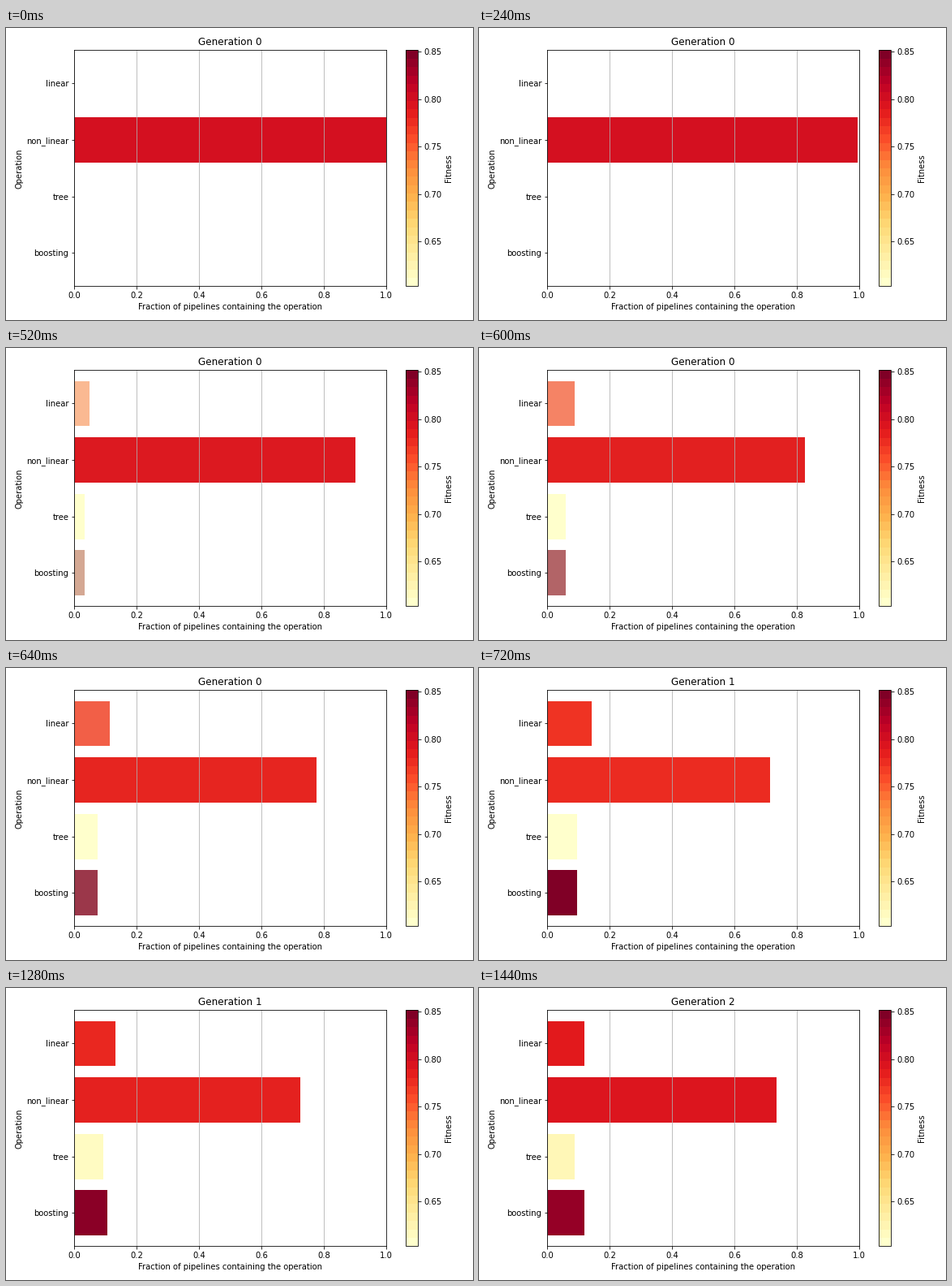
Recreate the animation shown at these times as a matplotlib script. Size 576x360 px, loop 2160 ms.

```python
import matplotlib.pyplot as plt
from matplotlib.animation import FuncAnimation
from matplotlib.cm import ScalarMappable
from matplotlib.colors import Normalize
import numpy as np

W, H, DPI = 576, 360, 72
STEPS = 18      # frames per generation
POWER = 4       # easing exponent

plt.rcParams.update({"font.family": "DejaVu Sans", "font.size": 10})

labels = ["linear", "non_linear", "tree", "boosting"]
cmap = plt.get_cmap("YlOrRd")

# One row per generation: share of pipelines and position on the colour scale
shares = np.array([
    [0, 1, 0, 0],
    [3 / 21, 15 / 21, 2 / 21, 2 / 21],
    [4 / 34, 25 / 34, 3 / 34, 4 / 34],
])
levels = np.array([
    [0, 0.80, 0, 0],
    [0.69, 0.71, 0, 1],
    [0.75, 0.773, 0.06, 0.955],
])
colors = cmap(levels)


def box(left, top, right, bottom):
    return [left / W, 1 - bottom / H, (right - left) / W, (bottom - top) / H]


fig = plt.figure(figsize=(W / DPI, H / DPI), dpi=DPI, facecolor="white")
ax = fig.add_axes(box(84.4, 27.4, 469, 318.4))
cax = fig.add_axes(box(493.4, 27.4, 508, 318.4))

bars = ax.barh(labels, shares[0], height=0.8, color=colors[0])
ax.set_xlim(0, 1)
ax.set_ylim(3.59, -0.59)
ax.xaxis.grid(True)
ax.set_xlabel("Fraction of pipelines containing the operation")
ax.set_ylabel("Operation")
title = ax.set_title("Generation 0")

scale = ScalarMappable(Normalize(0.603, 0.8515), plt.get_cmap("YlOrRd", 28))
fig.colorbar(scale, cax=cax, label="Fitness", ticks=[0.65, 0.7, 0.75, 0.8, 0.85])


def update(frame):
    gen, step = divmod(frame, STEPS)
    nxt = min(gen + 1, len(shares) - 1)
    p = (step / (STEPS - 1)) ** POWER
    widths = shares[gen] * (1 - p) + shares[nxt] * p
    fills = colors[gen] * (1 - p) + colors[nxt] * p
    for bar, width, fill in zip(bars, widths, fills):
        bar.set_width(width)
        bar.set_facecolor(fill)
    title.set_text(f"Generation {gen}")
    return [*bars, title]


anim = FuncAnimation(fig, update, frames=STEPS * len(shares), interval=40,
                     repeat=True, repeat_delay=0, blit=False)
plt.show()
```
